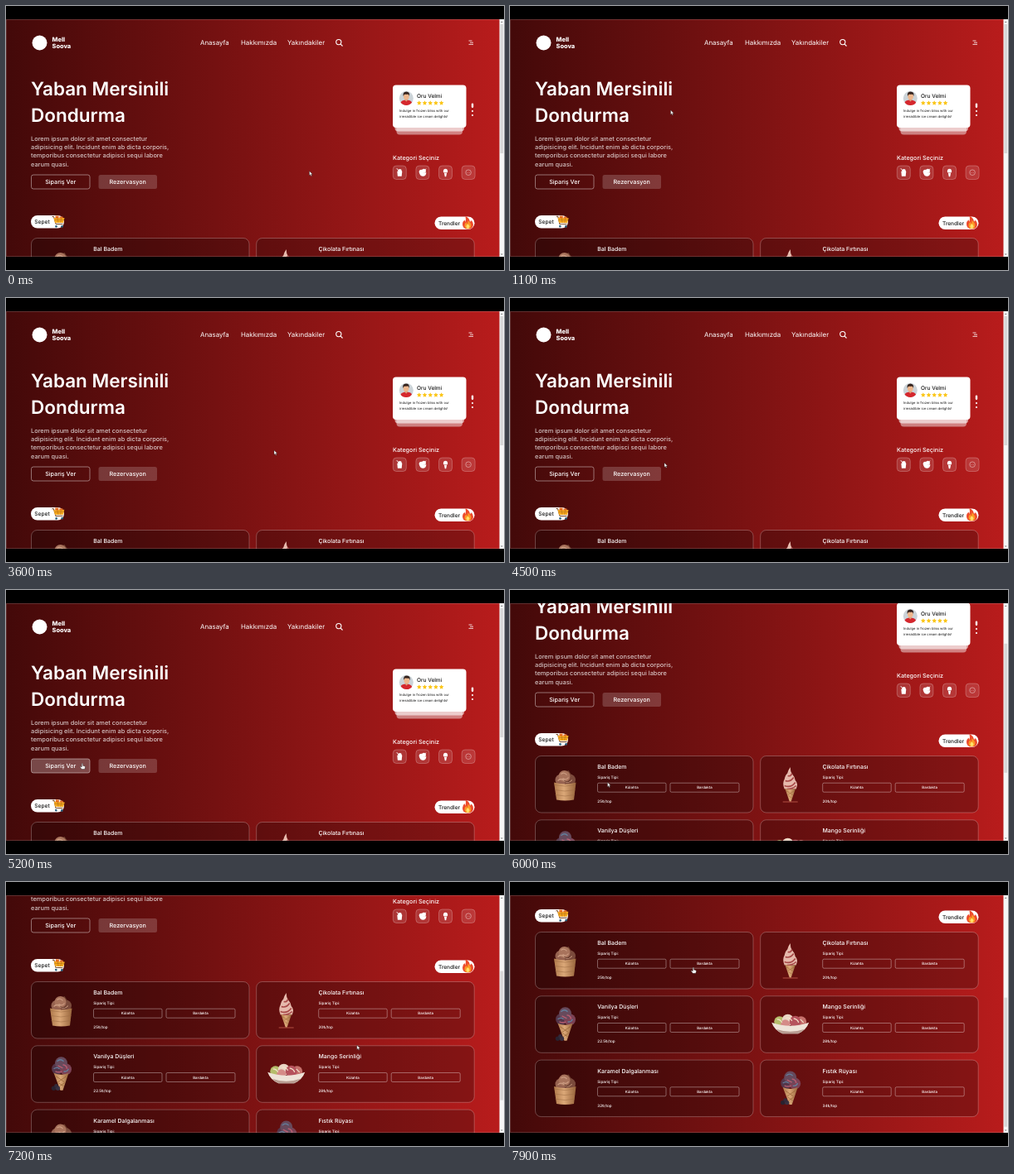
Recreate the animation shown at these times as an HTML page. Size 600x319 px, loop 8000 ms.

```html
<!DOCTYPE html>
<html lang="tr">
<head>
<meta charset="utf-8">
<title>Dondurma</title>
<style>
html, body { margin: 0; width: 100%; height: 100%; overflow: hidden; background: #000; }
svg { position: absolute; left: 0; top: 16px; width: 600px; height: 287px; }
text { font-family: Inter, "Open Sans", sans-serif; fill: #fff; text-rendering: geometricPrecision; white-space: pre; }
.mid { text-anchor: middle; }
.dark { fill: #181818; }
</style>
</head>
<body>
<svg viewBox="0 16 600 287">
  <defs>
    <linearGradient id="bg"><stop stop-color="#430909"/><stop offset="1" stop-color="#b91c1c"/></linearGradient>
    <linearGradient id="wafer"><stop stop-color="#b07a4c"/><stop offset=".45" stop-color="#dba878"/><stop offset="1" stop-color="#98653c"/></linearGradient>
    <g id="cup">
      <path d="M4-17.500l6 9-3 1-5-9z" fill="#6d3f2e"/>
      <circle cx="-5" cy="-6" r="7" fill="#966250"/><circle cx="5.500" cy="-6" r="7" fill="#7a4a3b"/>
      <circle cx="-1" cy="-10.500" r="7" fill="#a8735c"/>
      <path d="M-9-5q4-4 8 0t9-1M-5-13q4-3 7 1M-3-8q4 3 7-1" fill="none" stroke="#cb9c82" stroke-width="1.200"/>
      <path d="M-1-5q4 3 8-1" fill="none" stroke="#5c3226" stroke-width="1"/>
      <path d="M-13.500-3q13.500 4 26.500 0l-2.500 21q-10.500 2-21 0z" fill="url(#wafer)"/>
      <path d="M-13 0q13 3 25.500 0M-12.500 6q12 3 24.500 0M-12 12q12 3 23.500 0" fill="none" stroke="#9a6b42" stroke-width=".5"/>
    </g>
    <g id="soft">
      <path d="M-7 5q-3-7 0-12 1-5 3.500-7 1-4 3.500-7.500 0 5 2 8 3 3 4 8 4 4 1 10.500z" fill="#e6b9ac"/>
      <path d="M-7 1q8 3 13-4M-6-5q6 2 10-4M-3-11q4 1 5-3M-4 5q7 0 11-4" fill="none" stroke="#a84847" stroke-width="1.600"/>
      <path d="M-6.500 4q6.500 3 13 0l-5.500 16h-2z" fill="url(#wafer)"/>
      <path d="M-5 7l8 5M5 7l-8 5M-2 13l4 3" stroke="#94602d" stroke-width=".5"/>
      <path d="M-9 20.500h18" stroke="#d36a5a" stroke-width=".7"/>
    </g>
    <g id="scoops">
      <circle cx="-4.500" cy="-7" r="7" fill="#55364a"/><circle cx="5.500" cy="-6.500" r="7" fill="#7b4255"/>
      <circle cy="-14" r="7.500" fill="#674a5c"/>
      <path d="M-5-16q4-4 8 0M-9-7q4-3 7 0M3-4q4 1 6-3" fill="none" stroke="#637f9c" stroke-width="1.300"/>
      <path d="M2-12q5 1 5 5M-4-11l6 3M-7-4q4 2 8 0" fill="none" stroke="#b55c70" stroke-width="1.500"/>
      <path d="M-9-2q9 4 18 0L2 19h-3z" fill="url(#wafer)"/>
      <path d="M-6 2l10 7M6 2l-10 7M-3 10l6 4M4 10l-6 4" stroke="#8b5a2b" stroke-width=".6"/>
      <circle cx="-9" cy="16.500" r="2.700" fill="#28222f"/><circle cx="-4" cy="16.500" r="2.700" fill="#383040"/><circle cx="-6" cy="13.500" r="2.300" fill="#322a3a"/>
    </g>
    <g id="bowl">
      <circle cx="-13" cy="-4" r="6.500" fill="#b6bd6c"/><circle cx="13" cy="-4" r="6.500" fill="#c5706b"/>
      <circle cx="-3" cy="-6" r="7" fill="#ead5c4"/><circle cx="6" cy="-4" r="7" fill="#b5525c"/><circle cx="-6" cy="-1" r="5.500" fill="#d58b87"/>
      <path d="M-16-7q4 0 6 4M-5-9q5 0 7 4M4-8q5 1 6 5M12-7l4 4" fill="none" stroke="#f3e2cb" stroke-width="1.200"/>
      <path d="M-22.500-3q22.500 8 45 0-3 9-13 13.500h-19q-10-4.500-13-13.500z" fill="#eee3d8"/>
      <path d="M-17 5q17 6 34 0-3 3.500-7.500 5.500h-19q-4.500-2-7.500-5.500z" fill="#b99d92"/>
    </g>
  </defs>
  <rect y="16" width="600" height="287" fill="url(#bg)"/>
  <g id="page"></g>
  <rect x="594.5" y="16" width="5.500" height="287" fill="#f5f5f5"/>
  <path d="M596 20l1.300-1.500 1.300 1.500zM596 299.500l1.300 1.500 1.300-1.500z" fill="#777"/>
  <rect id="thumb" x="595.5" y="22" width="3.600" height="156" fill="#d6d6d6"/>
  <rect x=".5" y="16.500" width="599" height="286" fill="none" stroke="#fff" stroke-opacity=".15"/>
  <g id="cursor" fill="#fff" stroke="#222" stroke-width=".4">
    <path id="arrow" d="M0 0v5.300l1.200-1.100.9 1.900.9-.4-.9-1.900h1.700z"/>
    <path id="hand" d="M-.7.3q.7-.7 1.300 0v2.500l2.300.6q.7.300.5 1.200l-.6 2.400h-3.600l-2-2.700q0-.8.8-.6l1.300.8z"/>
  </g>
</svg>
<script>
const $ = id => document.getElementById(id);
const text = (x, y, size, str, weight = 400, cls = '', extra = '') =>
  `<text x="${x}" y="${y}" font-size="${size}" font-weight="${weight}" class="${cls}" ${extra}>${str}</text>`;
const box = (x, y, w, h, r, attrs) =>
  `<rect x="${x}" y="${y}" width="${w}" height="${h}" rx="${r}" ${attrs}/>`;
const outline = o => `fill="#fff" fill-opacity="0" stroke="#fff" stroke-opacity="${o}" stroke-width=".7"`;

const buttons = [];
const button = (x, y, w, h, r, label, size, attrs) => {
  buttons.push({ x, y, w, h });
  return box(x, y, w, h, r, `class="btn" ${attrs}`) +
    text(x + w / 2, y + h / 2 + size * .36, size, label, 500, 'mid');
};

const star = (cx, cy, r) => {
  const points = Array.from({ length: 10 }, (_, i) => {
    const a = i * Math.PI / 5, d = i % 2 ? r * .48 : r;
    return `${cx + d * Math.sin(a)},${cy - d * Math.cos(a)}`;
  });
  return `<polygon points="${points.join(' ')}" fill="#fbc618"/>`;
};

const header = () => `
  <circle cx="40.500" cy="44.500" r="9" fill="#fff"/>
  ${text(55.5, 43.2, 7.4, 'Mell', 800)}${text(55.5, 50.7, 7.4, 'Soova', 800)}
  ${text(234, 46.8, 7.9, 'Anasayfa')}${text(283, 46.8, 7.9, 'Hakkımızda')}${text(339, 46.8, 7.9, 'Yakındakiler')}
  <path d="M403.200 46.200l2.300 2.300" stroke="#fff" stroke-width="1.100"/>
  <circle cx="400.800" cy="43.600" r="3.100" fill="none" stroke="#fff" stroke-width="1.100"/>
  <path d="M557.500 42h4M559 44.200h4M557.500 46.400h5.500" stroke="#fff" stroke-width=".8"/>`;

const hero = () => text(30, 108, 22.5, 'Yaban Mersinili', 600) + text(30, 140, 22.5, 'Dondurma', 600) +
  ['Lorem ipsum dolor sit amet consectetur', 'adipisicing elit. Incidunt enim ab dicta corporis,',
   'temporibus consectetur adipisci sequi labore', 'earum quasi.']
    .map((s, i) => text(30, 162.6 + i * 10.4, 7.4, s, 500, '', 'fill-opacity=".75"')).join('') +
  button(30.5, 204, 70.5, 17, 2.5, 'Sipariş Ver', 7.2, outline(.6)) +
  button(111.5, 204, 70.5, 17, 2.5, 'Rezervasyon', 7.2, 'fill="#fff" fill-opacity=".18"');

const review = () => `
  ${box(470.5, 106, 79.5, 49.5, 4, 'fill="#fff" fill-opacity=".45"')}
  ${box(468.5, 102, 83.5, 49.5, 4, 'fill="#fff" fill-opacity=".6"')}
  ${box(466, 95.5, 88.5, 51.5, 4, 'fill="#fff"')}
  <circle cx="482.300" cy="111.500" r="8.500" fill="#cbd3d8"/>
  <g id="avatar">
    <path d="M475.500 116.600q1.500-3 6.800-3t6.800 3q-2.400 3.400-6.800 3.400t-6.800-3.400z" fill="#d5272d"/>
    <path d="M480.800 111h3v3l-1.500 1.500-1.500-1.500z" fill="#dd9f78"/>
    <ellipse cx="482.300" cy="109.200" rx="3.300" ry="4" fill="#efb78d"/>
    <path d="M478.700 109q-1-5.400 3.600-5.500 4.700.1 3.700 5.500l-1-2.300h-5z" fill="#34221d"/>
  </g>
  ${text(495, 110.7, 6.5, 'Oru Velmi', 500, 'dark')}
  ${[0, 1, 2, 3, 4].map(i => star(497.8 + i * 6.7, 117.2, 3)).join('')}
  ${text(474, 128, 4.15, 'Indulge in frozen bliss with our', 400, 'dark')}
  ${text(474, 135, 4.15, 'irresistible ice cream delights!', 400, 'dark')}
  ${box(560.8, 117.5, 2.4, 5.5, 1.2, 'fill="#fff"')}
  <circle cx="562" cy="127" r="1.100" fill="#fff"/><circle cx="562" cy="132" r="1.100" fill="#fff"/>`;

const icons = [
  '<path d="M-3-1.500h6l-.6 6h-4.800z"/><circle cx=".3" cy="-2" r="2.200"/><path d="M-1-2l-2.500-3" stroke="#fff"/>',
  '<circle cx="-1.700" cy="-1" r="2.500"/><circle cx="1.500" cy="-2" r="2.500"/><path d="M-4 0h8.500q-.5 4.500-4 4.500t-4.500-4.500z"/><path d="M2-2l2-2.500" stroke="#fff"/>',
  '<path d="M-2.500 0q-.8-4.500 2.500-4.500t2.500 4.500zM-1.600.5h3.200l-.9 4.500h-1.400z"/>',
  '<g opacity=".7"><circle r="3.300" fill="none" stroke="#fff" stroke-width=".6"/><circle cx="-1.400" r=".4"/><circle r=".4"/><circle cx="1.400" r=".4"/></g>'
];
const categories = () => text(466, 186, 7.2, 'Kategori Seçiniz', 500) + icons.map((icon, i) => {
  const x = 466.3 + i * 27.6;
  return box(x, 193, 16, 16.5, 4, 'fill="#fff" fill-opacity=".13" stroke="#fff" stroke-opacity=".4" stroke-width=".6"') +
    `<g transform="translate(${x + 8} 201.200)" fill="#fff">${icon}</g>`;
}).join('');

const pills = () => `
  ${box(30, 253, 40, 15.5, 7.75, 'fill="#fff"')}${text(34.3, 263.2, 6.6, 'Sepet', 500, 'dark')}
  <g id="cart">
    <path d="M55.500 254.500h2l2.500 9h8.500" fill="none" stroke="#704020" stroke-width="1"/>
    <path d="M57.500 256h13l-1.500 6h-10z" fill="#f5a91f"/>
    <path d="M59.500 253.500h4v3h-4zM64.500 254.500h4v2h-4z" fill="#e66d22"/>
    <path d="M58.500 258.500h11.500M62 256l1 6M66.500 256l-.7 6" stroke="#a86516" stroke-width=".5"/>
    <circle cx="60.500" cy="266.300" r="1.400" fill="#2f6480"/><circle cx="67.500" cy="266.300" r="1.400" fill="#2f6480"/>
  </g>
  ${box(516.5, 254.5, 48, 15.5, 7.75, 'fill="#fff"')}${text(521, 264.8, 6.5, 'Trendler', 500, 'dark')}
  <g id="flame">
    <path d="M0 0q-6.500 0-6.500-6 0-3 2.500-5l.8 2.500q1.200-3.500.2-7 5 2 5.500 7l1.500-2q2.500 2 2.500 5 0 5.500-6.500 5.500z" fill="#ee4b2b"/>
    <path d="M0-.4q-4 0-4-3.800 0-2.500 2.200-4.300.2 1.800 1.300 2.200.3-2 .5-4 3.800 2.800 3.800 6.100 0 3.800-3.800 3.800z" fill="#fb9a26"/>
    <path d="M0-.6q-2 0-2-2.200t2-3.200q2 1.500 2 3.200t-2 2.200z" fill="#ffe16a"/>
  </g>`;

const products = [
  ['Bal Badem', '25', 'cup'], ['Çikolata Fırtınası', '20', 'soft'],
  ['Vanilya Düşleri', '22.5', 'scoops'], ['Mango Serinliği', '28', 'bowl'],
  ['Karamel Dalgalanması', '32', 'cup'], ['Fıstık Rüyası', '34', 'scoops']
];
const cards = () => products.map(([name, price, art], i) => {
  const x = 30.5 + i % 2 * 271.2, y = 280.5 + (i >> 1) * 77.3;
  return box(x, y, 262.5, 68.5, 7, 'fill="#000" fill-opacity=".25" stroke="#fff" stroke-opacity=".35" stroke-width=".7"') +
    `<use href="#${art}" x="${x + 36}" y="${y + 35}"/>` +
    text(x + 74.8, y + 15.4, 6.95, name, 500) +
    text(x + 74.8, y + 27.4, 4.6, 'Sipariş Tipi:', 500) +
    button(x + 75, y + 32.7, 82.5, 11, 1.5, 'Külahta', 4.4, outline(.5)) +
    button(x + 162.5, y + 32.7, 83, 11, 1.5, 'Bardakta', 4.4, outline(.5)) +
    text(x + 74.8, y + 56.4, 4.6, price + '₺/top', 500);
}).join('');

$('page').innerHTML = header() + hero() + review() + categories() + pills() + cards();
const rects = document.querySelectorAll('.btn');

const clamp = v => Math.min(1, Math.max(0, v));
const smooth = v => v * v * (3 - 2 * v);

// Pointer tip: time, x, y
const path = [
  [0, 365.5, 199.5], [2100, 44.5, 62], [3600, 323, 184], [5200, 92, 209.5],
  [6000, 117.5, 232.5], [6800, 509.5, 237.5], [7900, 221, 103.3]
];
// Wheel notches: start time, distance
const wheel = [[5450, 40], [5700, 40], [6400, 40], [7000, 40], [7200, 40], [7400, 20]];

function pointer(t) {
  const i = Math.max(1, path.findIndex(k => k[0] >= t));
  const [a, b] = [path[i - 1], path[i]];
  const p = smooth(clamp((t - a[0]) / (b[0] - a[0])));
  return [a[1] + (b[1] - a[1]) * p, a[2] + (b[2] - a[2]) * p];
}

function draw(t) {
  const scroll = wheel.reduce((sum, [start, d]) => sum + d * smooth(clamp((t - start) / 200)), 0);
  const [x, y] = pointer(t);
  const over = buttons.findIndex(b => x >= b.x && x <= b.x + b.w && y + scroll >= b.y && y + scroll <= b.y + b.h);
  rects.forEach((r, i) => {
    if (i < 2) r.setAttribute('fill-opacity', i === over ? .25 : i ? .18 : 0);
  });
  $('page').setAttribute('transform', `translate(0 ${-scroll})`);
  $('thumb').setAttribute('y', 22 + scroll * .535);
  $('cursor').setAttribute('transform', `translate(${x} ${y})`);
  $('arrow').style.display = over < 0 ? '' : 'none';
  $('hand').style.display = over < 0 ? 'none' : '';

  const wave = Math.sin(t / 8000 * Math.PI * 16);
  $('avatar').setAttribute('transform', `rotate(${wave * 3} 482.3 119)`);
  $('cart').setAttribute('transform', `rotate(${wave * 3} 63 262)`);
  $('flame').setAttribute('transform', `translate(556.5 269.5) scale(1 ${1 + wave * .04})`);
}

const begin = performance.now();
function tick() {
  const t = (performance.now() - begin) % 8000;
  draw(Math.min(7900, Math.floor(t / 100) * 100));
  requestAnimationFrame(tick);
}
tick();
</script>
</body>
</html>
```
